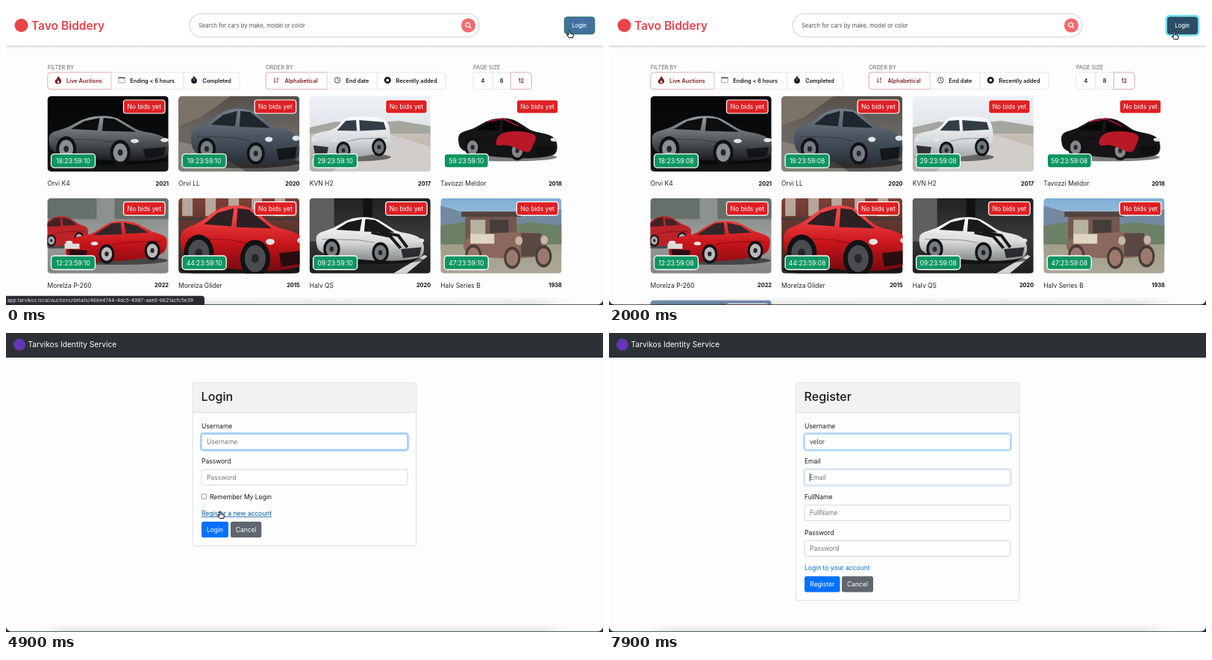
Write an HTML page with a canvas that moves like this. It is 800 by 401 pixels and loops after 8000 ms.

```html
<!DOCTYPE html>
<html lang="en">
<head>
<meta charset="utf-8">
<title>Auction sign up</title>
<style>
html, body { margin: 0; width: 100%; height: 100%; overflow: hidden; background: #fcfcfc; }
canvas { display: block; width: 800px; height: 401px; }
</style>
</head>
<body>
<canvas id="stage"></canvas>
<script>
const W = 800, H = 401, LOOP = 8000, STEP = 100;
const FONT = 'Inter, "Noto Sans", sans-serif';
const canvas = document.getElementById('stage');
const c = canvas.getContext('2d');
const ratio = window.devicePixelRatio || 1;
canvas.width = W * ratio;
canvas.height = H * ratio;
c.scale(ratio, ratio);

const LOGIN_AT = 3100, REGISTER_AT = 5500, POPUP_AT = 6400, TYPE_AT = 6900, TAB_AT = 7900;
const clamp = v => Math.max(0, Math.min(1, v));
const ease = v => { v = clamp(v); return v * v * (3 - 2 * v); };

// ---------- drawing helpers ----------
function rect(x, y, w, h, fill) {
  c.fillStyle = fill;
  c.fillRect(x, y, w, h);
}
function box(x, y, w, h, r, fill, stroke, line = 1) {
  c.beginPath();
  c.roundRect(x, y, w, h, r);
  if (fill) { c.fillStyle = fill; c.fill(); }
  if (stroke) { c.strokeStyle = stroke; c.lineWidth = line; c.stroke(); }
}
function text(s, x, y, size, color = '#212529', weight = 400, align = 'left') {
  c.font = `${weight} ${size}px ${FONT}`;
  c.textAlign = align;
  c.fillStyle = color;
  c.fillText(s, x, y);
}
function oval(x, y, rx, ry, fill) {
  c.beginPath();
  c.ellipse(x, y, rx, ry, 0, 0, 7);
  c.fillStyle = fill;
  c.fill();
}
function poly(fill, ...p) {
  c.beginPath();
  for (let i = 0; i < p.length; i += 2) c.lineTo(p[i], p[i + 1]);
  c.closePath();
  c.fillStyle = fill;
  c.fill();
}
function line(color, width, ...p) {
  c.beginPath();
  for (let i = 0; i < p.length; i += 2) c.lineTo(p[i], p[i + 1]);
  c.strokeStyle = color;
  c.lineWidth = width;
  c.stroke();
}
function ring(x, y, r, color, width) {
  c.beginPath();
  c.arc(x, y, r, 0, 7);
  c.strokeStyle = color;
  c.lineWidth = width;
  c.stroke();
}
function fade(y0, y1, ...colors) {
  const g = c.createLinearGradient(0, y0, 0, y1);
  colors.forEach((k, i) => g.addColorStop(i / (colors.length - 1), k));
  return g;
}
// closed curve through the midpoints of a rough outline
function blob(fill, p) {
  const n = p.length;
  const mid = i => [(p[i % n][0] + p[(i + 1) % n][0]) / 2, (p[i % n][1] + p[(i + 1) % n][1]) / 2];
  c.beginPath();
  c.moveTo(...mid(n - 1));
  for (let i = 0; i < n; i++) c.quadraticCurveTo(...p[i], ...mid(i));
  c.fillStyle = fill;
  c.fill();
}

// ---------- photo stand-ins, each 162 x 101 ----------
const COUPE = {
  body: [[0, .52], [.02, .36], [.16, .27], [.28, .08], [.4, 0], [.55, .02], [.66, .18], [.75, .33], [.9, .39], [.99, .5], [1.01, .78], [.96, .95], [.62, 1], [.3, .93], [.03, .82]],
  side: [[.19, .29], [.3, .12], [.43, .05], [.41, .32]],
  screen: [[.46, .05], [.55, .07], [.73, .35], [.45, .33]]
};
const SUV = {
  body: [[0, .45], [.03, .12], [.12, 0], [.5, -.02], [.6, .04], [.7, .3], [.93, .37], [1.01, .48], [1.01, .87], [.9, .98], [.5, .98], [.03, .84]],
  side: [[.06, .3], [.09, .12], [.4, .07], [.39, .33]],
  screen: [[.44, .07], [.57, .09], [.68, .32], [.43, .33]]
};
function car(shape, x, y, w, h, flip, body, glass, r, rim) {
  const px = a => x + (flip ? 1 - a : a) * w;
  const at = p => p.map(([a, b]) => [px(a), y + b * h]);
  oval(x + w / 2, y + h * .96, w * .5, h * .1, 'rgba(0,0,0,.5)');
  blob(body, at(shape.body));
  poly(glass, ...at(shape.side).flat());
  poly(glass, ...at(shape.screen).flat());
  // lower grille, door crease and lamps
  poly('rgba(12,13,15,.8)', ...at([[.79, .72], [.98, .68], [.96, .88], [.81, .92]]).flat());
  line('rgba(0,0,0,.3)', 1.2, ...at([[.06, .5], [.4, .52], [.55, .58]]).flat());
  for (const [a, b] of [[.72, .55], [.97, .53]]) oval(px(a), y + b * h, w * .035, h * .045, '#dfe4e6');
  for (const [a, b] of [[.15, .72], [.6, .8]]) {
    oval(px(a), y + b * h, r * .8, r, '#111214');
    oval(px(a), y + b * h, r * .56, r * .72, rim);
    oval(px(a), y + b * h, r * .2, r * .25, '#25272a');
  }
}
const RED = fade(25, 95, '#f04345', '#c9151b', '#7c0a10');
const photos = [
  () => {
    rect(0, 0, 162, 101, fade(0, 101, '#050608', '#0a0b0d', '#151618'));
    car(COUPE, 1, 26, 161, 62, false, fade(28, 90, '#94999b', '#55595c', '#121315'), '#0c0e10', 17, '#8b8f92');
  },
  () => {
    rect(0, 0, 162, 101, fade(0, 101, '#56504a', '#6b6864', '#5b5957'));
    poly('#7d7266', 0, 0, 70, 0, 30, 28, 0, 40);
    poly('#85817b', 0, 60, 45, 72, 90, 101, 0, 101);
    car(COUPE, 16, 16, 146, 76, false, fade(20, 90, '#717c8a', '#4a5460', '#2a3038'), '#20262d', 15, '#777c82');
  },
  () => {
    rect(0, 0, 162, 101, fade(0, 50, '#eef1f5', '#dde2e7'));
    poly('#a4a69f', 0, 42, 35, 34, 70, 37, 120, 33, 162, 40, 162, 53, 0, 53);
    rect(0, 50, 162, 51, fade(50, 101, '#c6beb4', '#b5b1ad'));
    poly('#d0cdca', 105, 50, 162, 68, 162, 101, 30, 101);
    car(SUV, 3, 28, 106, 56, true, fade(28, 90, '#fafbfc', '#d7dade', '#8f9499'), '#343d46', 12, '#70757a');
  },
  () => {
    rect(0, 0, 162, 101, '#fdfdfd');
    car(COUPE, 23, 29, 133, 55, false, '#151417', '#060608', 13, '#85868a');
    blob('#b91829', [[78, 49], [108, 46], [130, 52], [124, 66], [118, 78], [90, 64], [72, 68]]);
    line('#b91829', 1.6, 62, 34, 84, 30, 104, 40);
  },
  () => {
    rect(0, 0, 162, 101, fade(0, 101, '#768078', '#9d9d9b', '#858486'));
    rect(0, 0, 162, 28, '#66706a');
    rect(66, 0, 24, 34, '#8c928f');
    car(COUPE, -28, 24, 83, 41, true, '#bb2329', '#412326', 8, '#aaa');
    car(COUPE, 25, 30, 136, 56, true, RED, '#31272a', 13, '#bbb9b9');
    rect(23, 61, 20, 7, '#dedbd4');
  },
  () => {
    rect(0, 0, 162, 101, fade(0, 101, '#7e4035', '#54332d', '#2c2a2b'));
    for (let i = 0; i < 5; i++) rect(5 + i * 31, 0, 14, 24, '#b6a69b');
    rect(0, 26, 162, 4, '#453b38');
    car(COUPE, 2, 9, 168, 90, false, RED, '#2d2023', 25, '#4a4c4f');
  },
  () => {
    rect(0, 0, 162, 101, fade(0, 101, '#202122', '#38393a', '#1d1e1f'));
    rect(0, 0, 33, 58, '#5d5f60');
    rect(72, 0, 12, 48, '#111213');
    poly('#d3d5d5', 112, 101, 154, 76, 158, 78, 130, 101);
    car(COUPE, 8, 25, 145, 60, false, fade(28, 88, '#fff', '#d8dadb', '#7b7e80'), '#18191b', 14, '#787b7d');
    line('#18191b', 4, 83, 46, 108, 51, 122, 67);
    line('#18191b', 4, 93, 45, 119, 50, 131, 66);
  },
  () => {
    rect(0, 0, 162, 60, fade(0, 60, '#7fadd7', '#c1d4df'));
    poly('#7389a0', 0, 10, 28, 18, 66, 34, 105, 25, 162, 15, 162, 60, 0, 60);
    poly('#6c8068', 0, 37, 30, 32, 64, 46, 118, 32, 162, 37, 162, 70, 0, 70);
    rect(0, 62, 162, 39, fade(62, 101, '#a19f8b', '#aca798'));
    rect(33, 23, 69, 39, '#74574e');
    rect(28, 18, 80, 7, '#514440');
    rect(40, 29, 20, 21, '#b7b2a1');
    rect(66, 29, 25, 21, '#443e3b');
    blob('#8c675d', [[31, 50], [97, 45], [139, 47], [145, 74], [113, 82], [30, 78]]);
    rect(108, 47, 27, 31, '#5b4843');
    rect(40, 48, 32, 13, '#ded6c3');
    for (const [x, y] of [[44, 77], [96, 80], [138, 78]]) {
      oval(x, y, 11, 15, '#493c38');
      oval(x, y, 8, 11, '#9b7a6d');
    }
    oval(105, 57, 5, 6, '#c4b5a5');
    oval(139, 56, 5, 6, '#c4b5a5');
  },
  () => rect(0, 0, 162, 101, fade(0, 12, '#7d98b8', '#5c7898'))
];
const cars = [
  ['Orvi K4', 2021, 18], ['Orvi LL', 2020, 19], ['KVN H2', 2017, 29], ['Tavozzi Meldor', 2018, 59],
  ['Morelza P-260', 2022, 12], ['Morelza Glider', 2015, 44], ['Halv QS', 2020, '09'], ['Halv Series B', 1938, 47],
  ['', '', '']
];

// ---------- auction page ----------
function card(i, seconds) {
  const [name, year, days] = cars[i];
  const x = 55.5 + (i % 4) * 175.6, y = 121 + Math.floor(i / 4) * 136.7;
  c.save();
  c.translate(x, y);
  c.save();
  c.beginPath();
  c.roundRect(0, 0, 162.5, 101, 5);
  c.clip();
  photos[i]();
  c.restore();
  box(102, 5, 55.5, 18, 3.5, '#de2024', '#fff', 1.2);
  text('No bids yet', 129.8, 17.3, 8.5, '#fff', 400, 'center');
  box(5, 77.3, 59, 18.5, 4, '#0d9560', '#fff', 1.3);
  text(`${days}:23:59:${seconds}`, 34.5, 89.8, 8.5, '#fff', 400, 'center');
  text(name, 0, 120, 8.5, '#26282d');
  text(year, 162.5, 119.5, 7.4, '#111', 700, 'right');
  c.restore();
}
const icons = {
  flame(x, y) {
    blob('#7f1d1d', [[x, y - 6], [x + 3, y - 2], [x + 5, y + 2], [x + 2, y + 5], [x - 3, y + 5], [x - 5, y + 1], [x - 2, y - 1]]);
    oval(x + .3, y + 2.2, 1.3, 1.7, '#fff');
  },
  calendar(x, y) {
    box(x - 4.2, y - 3.4, 8.4, 6.8, .5, '#fff', '#777', .7);
    line('#333', 1.2, x - 4.4, y - 3.2, x + 4.4, y - 3.2);
  },
  watch(x, y) {
    oval(x, y + .6, 3.9, 3.9, '#111827');
    rect(x - 1.4, y - 5, 2.8, 1.5, '#111827');
    line('#fff', .8, x, y + .8, x, y - 1.6);
  },
  sort(x, y) {
    line('#7f1d1d', .8, x - 2, y - 3.5, x - 2, y + 3, x - 3.5, y + 1.3);
    line('#7f1d1d', .8, x - 2, y + 3, x - .6, y + 1.3);
    text('A', x + .4, y - .4, 4, '#7f1d1d', 600);
    text('Z', x + .4, y + 3.6, 4, '#7f1d1d', 600);
  },
  clock(x, y) {
    ring(x, y, 3.8, '#333', .9);
    line('#333', .8, x, y - 2.3, x, y + .3, x + 1.8, y + 1.2);
  },
  dot(x, y) {
    ring(x, y, 3.2, '#111', 2.6);
  }
};
function group(label, x, items) {
  text(label, x, 85.3, 7.3, '#64676e');
  const end = items[items.length - 1][0];
  box(x, 89, end - x, 22.7, 4, '#fff', '#e9eaec', .9);
  let left = x;
  items.forEach(([right, name, icon, on], i) => {
    const last = items.length - 1;
    const r = [i ? 0 : 4, i === last ? 4 : 0, i === last ? 4 : 0, i ? 0 : 4];
    box(left, 89, right - left, 22.7, r, null, on ? '#e2a9aa' : '#e9eaec', .9);
    const color = on ? '#7f1d1d' : '#151922';
    if (icon) {
      icons[icon](left + 14, 99.5);
      text(name, left + 25.3, 103, 7.3, color, 600);
    } else {
      text(name, (left + right) / 2, 103, 7.4, color, 600, 'center');
    }
    left = right;
  });
}
function home(t) {
  rect(0, 0, W, H, '#fdfdfd');
  rect(0, 53, W, 5, fade(53, 58, '#d6d6d6', '#f2f2f2', '#fdfdfd'));
  rect(0, 0, W, 53, '#fff');
  oval(20.5, 26, 9, 9, '#ea4449');
  text('Tavo Biddery', 34, 32, 15.5, '#e8434a', 600);
  box(246, 10.5, 388, 31, 15.5, '#fff', '#dedfe1', 1.6);
  text('Search for cars by make, model or color', 258, 29, 7.55, '#52555b');
  oval(619.5, 26, 9.6, 9.6, '#f5696d');
  ring(618.7, 25.2, 2.9, '#fff', 1.3);
  line('#fff', 1.5, 620.8, 27.3, 623.3, 29.8);

  if (t >= 900) {
    c.globalAlpha = .6 + .4 * ease((t - 900) / 900);
    box(745.5, 11.8, 46, 28.6, 6, '#78e1f3');
    c.globalAlpha = 1;
    box(748, 14.4, 41, 23.6, 4, '#2c4d65');
  } else {
    box(748.3, 14.8, 40.5, 22.8, 4, '#42709f', '#35786f', 1.2);
  }
  text('Login', 768.3, 28.7, 7.4, '#f2f8fb', 500, 'center');

  group('FILTER BY', 55.8, [[141, 'Live Auctions', 'flame', true], [238, 'Ending < 6 hours', 'calendar'], [313.3, 'Completed', 'watch']]);
  group('ORDER BY', 348.2, [[430.3, 'Alphabetical', 'sort', true], [497.3, 'End date', 'clock'], [589.3, 'Recently added', 'dot']]);
  group('PAGE SIZE', 626, [[652, '4'], [676.4, '8'], [704.3, '12', '', true]]);
  const seconds = String(10 - Math.floor(t / 1000)).padStart(2, '0');
  cars.forEach((_, i) => card(i, seconds));
  bottomShade();

  if (t < 600) {
    c.globalAlpha = 1 - clamp((t - 300) / 300);
    box(-4, 388.8, 270, 16, 4, '#2a2b2e');
    text('app.tarvikos.local/auctions/details/466e4744-4dc5-4987-aae0-b621acfc5e39', 2, 397.4, 6.7, '#e6e7e9');
    c.globalAlpha = 1;
  }
}

// ---------- identity pages ----------
const pages = {
  Login: { fields: ['Username', 'Password'], link: 'Register a new account', linkY: 245.2, buttonY: 253, split: 298, cancel: 301, end: 342.3, bottom: 285.5 },
  Register: { fields: ['Username', 'Email', 'FullName', 'Password'], link: 'Login to your account', linkY: 318.4, buttonY: 326.3, split: 309.5, cancel: 312, end: 354, bottom: 358.5 }
};
const fieldY = i => 135.4 + i * 47.7;
const overField = (page, p) => p.x > 262 && p.x < 538 && page.fields.some((_, i) => p.y > fieldY(i) && p.y < fieldY(i) + 21);
const overLink = (page, p) => p.x > 262 && p.x < 356 && Math.abs(p.y - page.linkY + 3) < 6;

function field(name, i, value, focus, caret) {
  const y = fieldY(i);
  text(name, 262, y - 7.7, 8.5, '#17191c');
  if (focus) box(260.9, y - 1, 278.2, 23.2, 3.5, null, `rgba(0,123,255,${.3 * focus})`, 2.2);
  const mix = (a, b) => Math.round(a + (b - a) * focus);
  box(262, y, 276, 21, 2.5, '#fff', `rgb(${mix(206, 120)},${mix(211, 180)},${mix(217, 250)})`, .9);
  text(value || name, 269, y + 13.6, 8.5, value ? '#33383d' : '#70777e');
  if (caret) {
    const x = 268.7 + (value ? c.measureText(value).width + .6 : 0);
    rect(x, y + 5, .8, 11, '#222');
  }
}
function bottomShade() {
  const g = c.createLinearGradient(40, 0, 760, 0);
  [[0, 0], [.06, .09], [.94, .09], [1, 0]].forEach(([k, a]) => g.addColorStop(k, `rgba(0,0,0,${a})`));
  for (let i = 0; i < 10; i++) {
    c.globalAlpha = (i + 1) / 10;
    rect(40, 390 + i, 720, 1, g);
  }
  c.globalAlpha = 1;
}
function identity(title, values, focus, caretAt, p) {
  const page = pages[title];
  rect(0, 0, W, H, '#fdfdfd');
  bottomShade();
  rect(0, 0, W, 33, '#2c3136');
  oval(18, 15.5, 8, 8, '#6236b5');
  text('Tarvikos Identity Service', 29.5, 18.8, 10.2, '#fff');

  box(250.3, 66.7, 299.4, page.bottom - 66.7, 2.5, '#fefefe', '#dcdcdc', .9);
  box(250.8, 67.2, 298.4, 38.8, [2.5, 2.5, 0, 0], '#f2f2f2');
  line('#d9d9d9', .9, 250.3, 106.3, 549.7, 106.3);
  text(title, 261.6, 90.5, 16.1, '#17191c', 500);
  page.fields.forEach((name, i) => field(name, i, values[i], focus[i] || 0, caretAt === i));
  if (title === 'Login') {
    box(262.3, 216, 6.5, 6.5, 1.4, '#fff', '#777', .8);
    text('Remember My Login', 273, 222.8, 8.5, '#17191c');
  }
  const hover = overLink(page, p);
  text(page.link, 262, page.linkY, 8.5, hover ? '#0056a8' : '#0b6dcc');
  if (hover) rect(262, page.linkY + 1.1, c.measureText(page.link).width, .8, '#0056a8');
  const y = page.buttonY;
  box(262, y, page.split - 262, 21.2, 2.5, '#0471fb');
  text(title, (262 + page.split) / 2, y + 13.6, 8.5, '#fff', 400, 'center');
  box(page.cancel, y, page.end - page.cancel, 21.2, 2.5, '#5f666d');
  text('Cancel', (page.cancel + page.end) / 2, y + 13.6, 8.5, '#fff', 400, 'center');
}
function popup(typed) {
  const names = ['pim', 'velor', 'vix', 'olina', 'jor'].filter(n => n.startsWith(typed) && n !== typed);
  if (!names.length) return;
  poly('#1a1b1d', 322, 162.5, 327.5, 156.8, 333, 162.5);
  c.shadowColor = 'rgba(0,0,0,.3)';
  c.shadowBlur = 4 * ratio;
  box(316.8, 161.7, 86.6, 3.8 + names.length * 20, 2.5, '#1a1b1d');
  c.shadowBlur = 0;
  names.forEach((n, i) => text(n, 323.3, 176.4 + i * 20, 7.1, '#f1f1f2', 600));
}

// ---------- pointer ----------
const stops = [[300, 754.6, 33], [900, 757.3, 35], [3600, 757.8, 35], [4700, 286.8, 239], [5600, 286.8, 239], [6200, 304.4, 147.5]];
function pointerAt(t) {
  let [t0, x, y] = stops[0];
  for (const [t1, x1, y1] of stops) {
    if (t < t1) {
      const k = ease((t - t0) / (t1 - t0 || 1));
      return { x: x + (x1 - x) * k, y: y + (y1 - y) * k };
    }
    [t0, x, y] = [t1, x1, y1];
  }
  return { x, y };
}
function pointer(kind, p) {
  c.save();
  c.translate(p.x, p.y);
  c.lineJoin = 'round';
  if (kind === 'beam') {
    line('#fff', 2, 0, -4.5, 0, 4.5);
    line('#111', .9, -1.8, -5, 0, -4.3, 1.8, -5);
    line('#111', .9, 0, -4.5, 0, 4.5);
    line('#111', .9, -1.8, 5, 0, 4.3, 1.8, 5);
  } else {
    const hand = kind === 'hand';
    const path = new Path2D(hand
      ? 'M-.8 .8Q0-.6 .9 .7L1.3 4Q2.2 3.2 2.9 4.4Q3.9 3.8 4.4 5Q5.6 4.8 5.6 6.2L4.8 9.6H-.2L-3 6Q-2.8 4.6-1.2 5.8L-.6 6.2Z'
      : 'M0 0V8L1.9 6.3L3.2 9.2L4.5 8.6L3.2 5.8H5.7Z');
    c.fillStyle = hand ? '#fff' : '#0a0a0a';
    c.strokeStyle = hand ? '#111' : '#fff';
    c.lineWidth = .9;
    c.stroke(path);
    c.fill(path);
    if (hand) c.stroke(path);
  }
  c.restore();
}

// dark desktop behind the rounded lower window corners
function windowEdge() {
  c.beginPath();
  c.rect(0, -20, W, H + 20);
  c.roundRect(0, -20, W, 420.3, [0, 0, 7, 7]);
  c.fillStyle = '#1d2c36';
  c.fill('evenodd');
}

// ---------- timeline ----------
function draw(t) {
  const p = pointerAt(t);
  const blink = since => (t - since) % 1000 < 500;
  if (t < LOGIN_AT) {
    home(t);
    pointer('hand', p);
  } else if (t < REGISTER_AT) {
    const page = pages.Login;
    identity('Login', [], [clamp((t - LOGIN_AT) / 200)], blink(LOGIN_AT) ? 0 : -1, p);
    pointer(overLink(page, p) ? 'hand' : overField(page, p) ? 'beam' : 'arrow', p);
  } else {
    const typed = 'velor'.slice(0, t < TYPE_AT ? 0 : 1 + Math.floor((t - TYPE_AT) / 150));
    const tabbed = t >= TAB_AT;
    const focus = tabbed ? [.75, .3] : [clamp((t - REGISTER_AT + 100) / 200)];
    const caret = tabbed ? 1 : blink(REGISTER_AT) ? 0 : -1;
    identity('Register', [typed], focus, caret, p);
    if (t >= POPUP_AT && !tabbed) popup(typed);
    if (t < TYPE_AT) pointer(overField(pages.Register, p) ? 'beam' : 'arrow', p);
  }
  windowEdge();
}

const start = performance.now();
let shown = -1;
function tick() {
  const t = Math.floor(((performance.now() - start) % LOOP) / STEP) * STEP;
  if (t !== shown) draw(shown = t);
  requestAnimationFrame(tick);
}
tick();
</script>
</body>
</html>
```
